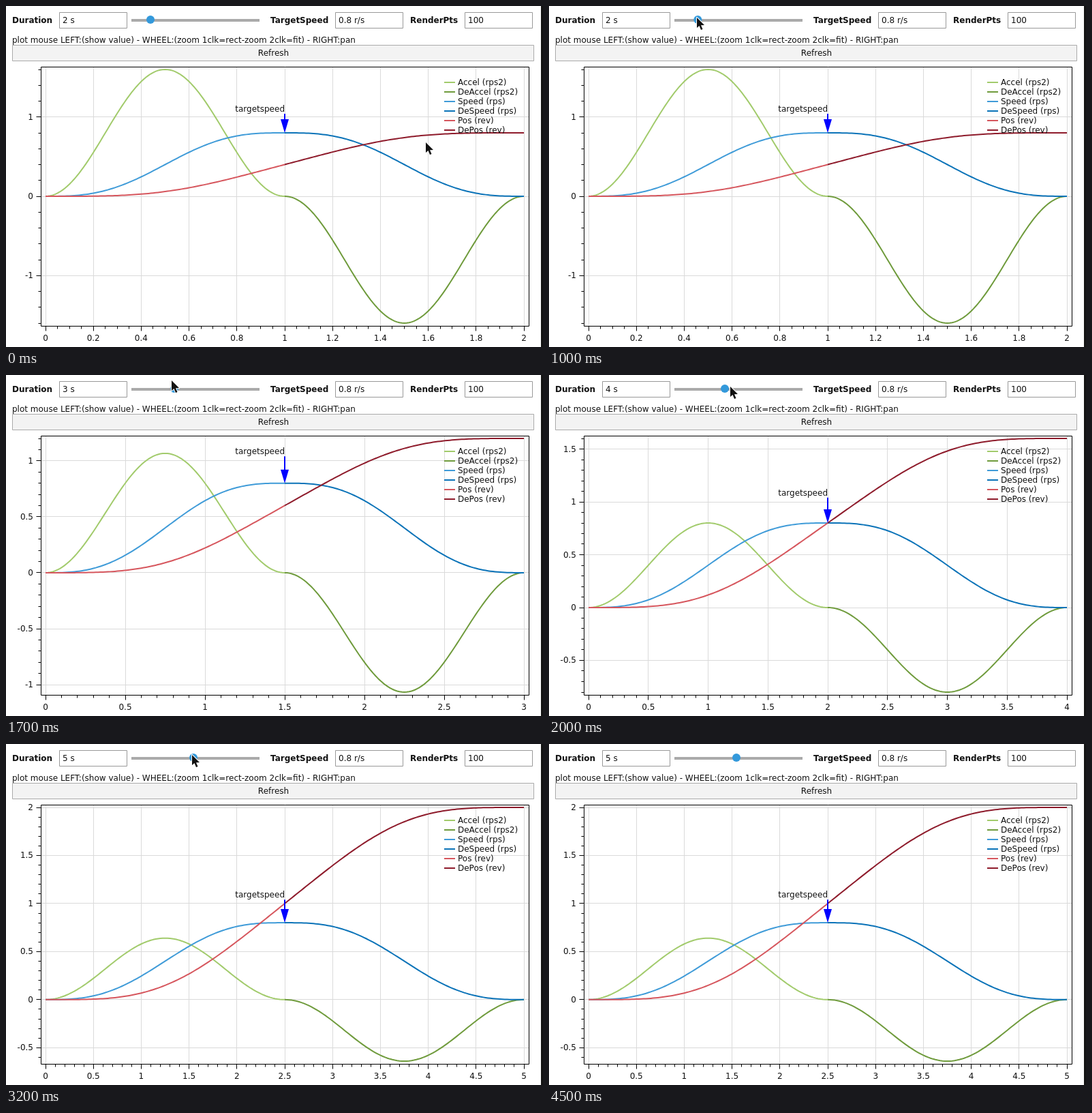
These frames come from a looping animation (788 px wide and 500 px high, 4600 ms). An HTML page with a canvas:

```html
<!DOCTYPE html>
<html lang="en">
<head>
<meta charset="utf-8">
<title>Motion profile plot</title>
<style>
  html, body { margin: 0; width: 100%; height: 100%; overflow: hidden; background: #fff; }
  canvas { display: block; width: 788px; height: 500px; }
</style>
</head>
<body>
<canvas id="stage" width="788" height="500"></canvas>
<script>
const ctx = document.getElementById('stage').getContext('2d');
const LOOP = 4600, STEP = 100;
const FONT = '12px "DejaVu Sans", sans-serif';
const BOX = { l: 51.5, t: 89.5, r: 767.5, b: 469.5 };
const X0 = 58, X1 = 760, Y0 = 93, Y1 = 465;
const TARGET = 0.8;
const TAU = Math.PI * 2;

// [time, value...] keys
const CURSOR = [
  [0, 616, 200], [400, 211, 17], [800, 211, 17], [1300, 227, 16], [1600, 239, 6],
  [2000, 266, 17], [2200, 272, 17], [2600, 273, 16], [3700, 273, 16], [4400, 795, 180]
];
const THUMB = [[800, 212], [1300, 230], [2000, 258], [2200, 273], [2500, 275]];
const DURATION = [[0, 2], [1200, 2.5], [1500, 3], [1800, 3.5], [2000, 4], [2100, 4.5], [2200, 5]];

const SERIES = [
  ['Accel (rps2)', '#a2cb6c'], ['DeAccel (rps2)', '#6f9b3c'],
  ['Speed (rps)', '#3f9bd8'], ['DeSpeed (rps)', '#0b73b8'],
  ['Pos (rev)', '#d6565d'], ['DePos (rev)', '#8e1b2b']
];

function tween(keys, t) {
  if (t <= keys[0][0]) return keys[0].slice(1);
  for (let i = 1; i < keys.length; i++) {
    const a = keys[i - 1], b = keys[i];
    if (t <= b[0]) {
      const u = (t - a[0]) / (b[0] - a[0]);
      const e = u * u * (3 - 2 * u);
      return a.slice(1).map((v, k) => v + (b[k + 1] - v) * e);
    }
  }
  return keys[keys.length - 1].slice(1);
}

const held = (keys, t) => keys.filter(k => k[0] <= t).pop()[1];

function text(s, x, y, align = 'left', weight = '') {
  ctx.font = weight + ' ' + FONT;
  ctx.textAlign = align;
  ctx.fillStyle = '#111';
  ctx.fillText(s, x, y);
}

function line(x1, y1, x2, y2, color, width = 1) {
  ctx.strokeStyle = color;
  ctx.lineWidth = width;
  ctx.beginPath();
  ctx.moveTo(x1, y1);
  ctx.lineTo(x2, y2);
  ctx.stroke();
}

function rect(x, y, w, h, fill, stroke) {
  ctx.fillStyle = fill;
  ctx.fillRect(x, y, w, h);
  ctx.strokeStyle = stroke;
  ctx.lineWidth = 1;
  ctx.strokeRect(x + 0.5, y + 0.5, w - 1, h - 1);
}

function field(label, lx, x, value) {
  text(label, lx, 25, 'left', 'bold');
  rect(x, 9, 100, 24, '#fff', '#999');
  text(value, x + 5, 25);
}

function controls(duration, thumb) {
  field('Duration', 9, 78, duration + ' s');
  field('TargetSpeed', 388, 483, '0.8 r/s');
  field('RenderPts', 593, 673, '100');
  ctx.fillStyle = '#aaa';
  ctx.fillRect(184, 19, 188, 4);
  ctx.fillStyle = '#3399db';
  ctx.beginPath();
  ctx.arc(thumb, 20, 6, 0, TAU);
  ctx.fill();
  text('plot mouse LEFT:(show value) - WHEEL:(zoom 1clk=rect-zoom 2clk=fit) - RIGHT:pan', 9, 54);
  rect(9, 57, 766, 24, '#f3f3f3', '#aaa');
  text('Refresh', 392.5, 73, 'center');
}

// Smallest 1-2-5 step that leaves at most `max` intervals
function tickStep(range, max) {
  for (const s of [0.1, 0.2, 0.5, 1, 2]) if (range / s <= max) return s;
  return 5;
}

function ticks(step, lo, hi, draw) {
  for (let i = Math.ceil(lo / step); i <= Math.floor(hi / step); i++) draw(+(i * step).toFixed(4));
}

const snap = v => Math.floor(v) + 0.5;
const minorOf = step => step / (step === 0.2 ? 4 : 5);

function plot(duration) {
  const h = duration / 2, peak = 2 * TARGET / h, w = TAU / h;
  const top = Math.max(peak, TARGET * h);
  const kx = (X1 - X0) / duration, ky = (Y1 - Y0) / (top + peak);
  const px = v => X0 + v * kx, py = v => Y0 + (top - v) * ky;
  const xLo = (BOX.l - X0) / kx, xHi = (BOX.r - X0) / kx;
  const yLo = top - (BOX.b - Y0) / ky, yHi = top - (BOX.t - Y0) / ky;
  const sx = tickStep(xHi - xLo, (BOX.r - BOX.l) / 60);
  const sy = tickStep(yHi - yLo, (BOX.b - BOX.t) / 60);

  ticks(minorOf(sx), xLo, xHi, v => line(snap(px(v)), BOX.b, snap(px(v)), BOX.b + 4, '#000'));
  ticks(minorOf(sy), yLo, yHi, v => line(BOX.l - 4, snap(py(v)), BOX.l, snap(py(v)), '#000'));
  ticks(sx, xLo, xHi, v => {
    const x = snap(px(v));
    line(x, BOX.t, x, BOX.b, '#dadada');
    line(x, BOX.b, x, BOX.b + 7, '#000');
    text(String(v), px(v), 491, 'center');
  });
  ticks(sy, yLo, yHi, v => {
    const y = snap(py(v));
    line(BOX.l, y, BOX.r, y, '#dadada');
    line(BOX.l - 7, y, BOX.l, y, '#000');
    text(String(v), 40, Math.round(py(v)) + 4, 'right');
  });

  const accel = t => peak / 2 * (1 - Math.cos(w * t));
  const speed = t => peak / 2 * (t - Math.sin(w * t) / w);
  const pos = t => peak / 2 * (t * t / 2 + (Math.cos(w * t) - 1) / (w * w));
  const curves = [
    accel, t => -accel(t),
    speed, t => TARGET - speed(t),
    pos, t => TARGET * h / 2 + TARGET * t - pos(t)
  ];
  ctx.lineWidth = 2;
  ctx.lineJoin = 'round';
  curves.forEach((f, i) => {
    ctx.strokeStyle = SERIES[i][1];
    ctx.beginPath();
    for (let k = 0; k <= 100; k++) {
      const t = h * k / 100;
      ctx.lineTo(px(t + (i % 2) * h), py(f(t)));
    }
    ctx.stroke();
  });

  const ax = px(h), tip = py(TARGET), tail = py(TARGET * 1.3);
  line(ax, tail, ax, tip - 18, '#00f', 2);
  ctx.fillStyle = '#00f';
  ctx.beginPath();
  ctx.moveTo(ax, tip);
  ctx.lineTo(ax - 6, tip - 20);
  ctx.lineTo(ax + 6, tip - 20);
  ctx.fill();
  text('targetspeed', ax, Math.round(tail) - 3, 'right');

  ctx.strokeStyle = '#000';
  ctx.lineWidth = 1;
  ctx.strokeRect(BOX.l, BOX.t, BOX.r - BOX.l, BOX.b - BOX.t);
  SERIES.forEach(([name, color], i) => {
    const y = 112 + 14 * i;
    line(643, y, 659, y, color, 2);
    text(name, 663, y + 4);
  });
}

function cursor(x, y) {
  ctx.save();
  ctx.translate(Math.round(x), Math.round(y));
  ctx.beginPath();
  [[0, 0], [0, 15], [3.5, 12], [6, 18], [8.5, 17], [6, 11.2], [11, 11]]
    .forEach(p => ctx.lineTo(...p));
  ctx.closePath();
  ctx.lineWidth = 2;
  ctx.lineJoin = 'round';
  ctx.strokeStyle = '#fff';
  ctx.stroke();
  ctx.fillStyle = '#111';
  ctx.fill();
  ctx.restore();
}

function render(now) {
  const t = Math.floor(now % LOOP / STEP) * STEP;
  const duration = held(DURATION, t);
  ctx.fillStyle = '#fff';
  ctx.fillRect(0, 0, 788, 500);
  controls(duration, tween(THUMB, t)[0]);
  plot(duration);
  ctx.fillStyle = '#141414';
  ctx.fillRect(785, 0, 3, 500);
  cursor(...tween(CURSOR, t));
}

let start;
function tick(now) {
  if (start === undefined) start = now;
  render(Math.max(0, now - start));
  requestAnimationFrame(tick);
}
render(0);
requestAnimationFrame(tick);
</script>
</body>
</html>
```
